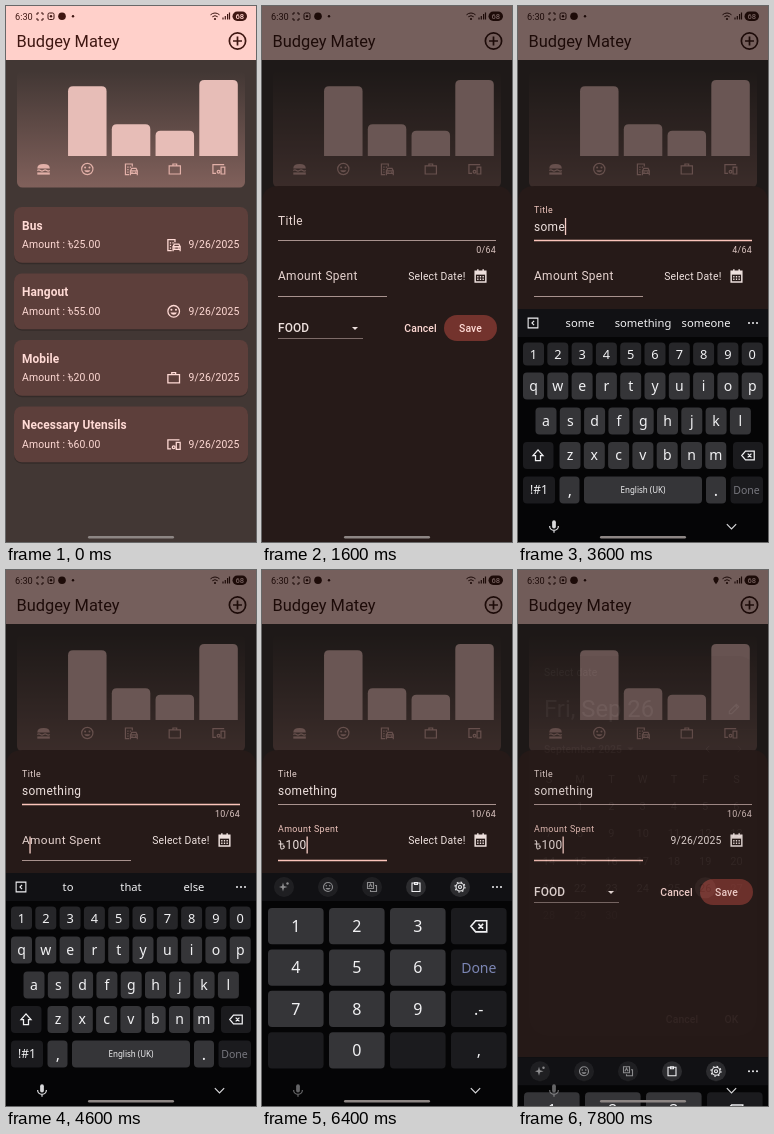
Write an HTML page that moves like this. It is 250 px wide and 536 px high and loops after 8000 ms.

```html
<!DOCTYPE html>
<html lang="en">
<head>
<meta charset="utf-8">
<title>Expense tracker</title>
<style>
html, body { margin: 0; width: 100%; height: 100%; overflow: hidden; background: #423734; }
svg { display: block; width: 100%; height: 100%; }
text { font-family: Roboto, sans-serif; white-space: pre; }
#board text { font-family: "Noto Sans", sans-serif; }
</style>
</head>
<body>
<svg id="stage" viewBox="0 0 250 536"></svg>
<script>
const LOOP = 8000;
const INK = '#3f1712', ROSE = '#e7bdb7', PALE = '#ffdad5', PRIMARY = '#ffb4aa', SOFT = '#ede0dd';
const S = { sm: 8.9, md: 10.4, lg: 11.9 };

// ---------- markup helpers ----------
const text = (x, cy, str, size, o = {}) =>
  `<text x="${x}" y="${cy + size * 0.355}" font-size="${size}" fill="${o.fill || SOFT}"` +
  ` font-weight="${o.w || 400}" text-anchor="${o.a || 'start'}" letter-spacing="${o.ls ?? 0.18}"` +
  `${o.id ? ` id="${o.id}"` : ''}>${str}</text>`;
const box = (x, y, w, h, r, fill, extra = '') =>
  `<rect x="${x}" y="${y}" width="${w}" height="${h}" rx="${r}" fill="${fill}" ${extra}/>`;
const line = (x1, x2, y, col, w = 1, extra = '') =>
  `<path d="M${x1} ${y}H${x2}" stroke="${col}" stroke-width="${w}" ${extra}/>`;
const group = (id, body) => `<g id="${id}">${body}</g>`;
const range = n => [...Array(n).keys()];
const p = (d, extra = '') => `<path d="${d}" ${extra}/>`;
const solid = 'fill="currentColor" stroke="none"';
const dot = (x, y, r) => `<circle cx="${x}" cy="${y}" r="${r}" ${solid}/>`;
const ring = (x, y, r, extra = '') => `<circle cx="${x}" cy="${y}" r="${r}" ${extra}/>`;

// Icons live on a 24 unit grid
const ICONS = {
  food: p('M2 11q0-7 10-7t10 7z', solid) + p('M2 14.5q2.500-2 5 0t5 0 5 0 5 0') + p('M2 17.500h20v3.500H2z', solid),
  fun: ring(12, 12, 9) + dot(8.5, 9.5, 1.6) + dot(15.5, 9.5, 1.6) + p('M7 14h10a5.4 5.4 0 0 1-10 0z', solid),
  travel: p('M9 21H3V4h11v4M6 9h2M10 9h2M6 13h2M6 17h2') +
    p('M11 22v-7l2-4h7l2 4v7M11 15h11v4H11z') + dot(13.5, 17, 1.2) + dot(19.5, 17, 1.2),
  work: p('M3 7h18v13H3zM9 7V4h6v3'),
  tech: p('M8 19H3V5h18M16 9h6v11h-6z') + ring(12, 16.5, 2.2),
  add: ring(12, 12, 10) + p('M12 6.5v11M6.5 12h11'),
  calendar: p('M4 5h16v16H4zM8 2v4M16 2v4') + p('M4 5h16v5H4z', solid) + p('M7 13h2M11 13h2M15 13h2M7 17h2M11 17h2M15 17h2'),
  pencil: p('M4 20v-4L16 4l4 4L8 20zM14 6l4 4'),
  left: p('M15 5l-7 7 7 7'),
  right: p('M9 5l7 7-7 7'),
  down: p('M4 8l8 8 8-8'),
  erase: p('M8 5h14v14H8l-6-7zM11.5 9l6 6M17.5 9l-6 6'),
  shift: p('M12 3l8 9h-4v8H8v-8H4z'),
  mic: p('M9 5a3 3 0 0 1 6 0v7a3 3 0 0 1-6 0z', solid) + p('M5 11a7 7 0 0 0 14 0M12 18v4'),
  spark: p('M10 3l2 7 7 2-7 2-2 7-2-7-6-2 6-2z', solid) + dot(19, 5, 2.4),
  swap: p('M3 3h12v12H3zM9 18v3h12V9h-3M6 12l3-6 3 6'),
  clip: p('M4 4h16v17H4zM9 3h6v4H9z'),
  gear: ring(12, 12, 3) + ring(12, 12, 8) + ring(12, 12, 10, 'stroke-dasharray="3.2 4.65"'),
  panel: p('M3 3h18v18H3zM14 8l-4 4 4 4'),
  pin: p('M12 22Q5 13 5 9a7 7 0 0 1 14 0q0 4-7 13z', solid)
};
const icon = (name, x, y, size, col, w = 2) =>
  `<g transform="translate(${x - size / 2} ${y - size / 2}) scale(${size / 24})" fill="none"` +
  ` stroke="currentColor" stroke-width="${w}" color="${col}">${ICONS[name]}</g>`;
const taka = (x, cy, size, col) =>
  `<g transform="translate(${x} ${cy + size * 0.355}) scale(${size / 10})" fill="none" stroke="${col}"` +
  ` stroke-width=".85"><path d="M.3-7q1.7-.6 1.7 1.2v4q0 1.7 1.5 1.5 2-.4 1.3-2.5M.2-4.3h4.2"/>` +
  `<circle cx="4.4" cy="-2.7" r=".3"/></g>`;
const caret = (x, y, col) => `<path d="M${x - 3} ${y - 1.6}h6l-3 3.2z" fill="${col}"/>`;

// ---------- home screen ----------
const KINDS = ['food', 'fun', 'travel', 'work', 'tech'];
const SPENT = [0, 55, 25, 20, 60];
const ITEMS = [['Bus', 2], ['Hangout', 1], ['Mobile', 3], ['Necessary Utensils', 4]];

function statusBar() {
  return text(9, 10.5, '6:30', 9.2, { fill: INK, ls: 0 }) +
    p('M31 9V7h2M35 7h2v2M37 12v2h-2M33 14h-2v-2', `fill="none" stroke="${INK}"`) +
    box(42, 7, 6, 6.5, 1.5, 'none', `stroke="${INK}"`) + `<circle cx="45" cy="10.2" r="1.2" fill="${INK}"/>` +
    `<circle cx="56" cy="10.3" r="3.8" fill="${INK}"/><circle cx="67" cy="10.3" r="1.2" fill="${INK}"/>` +
    group('place', icon('pin', 198, 10.5, 9, INK)) +
    p('M204.5 8.8q4.5-3.6 9 0M206.3 10.8q2.7-2.2 5.4 0', `fill="none" stroke="${INK}"`) +
    `<circle cx="209" cy="13" r="1.1" fill="${INK}"/>` +
    p('M217 13.5v-2M219.3 13.5V10M221.6 13.5V8M223.5 13.5v-7', `stroke="${INK}" stroke-width="1.2"`) +
    box(226.5, 5.5, 14.5, 9.5, 4.7, INK) + text(233.7, 10.3, '68', 7.6, { fill: '#ffd0ca', a: 'middle', ls: 0, w: 500 });
}

function home() {
  const bars = SPENT.map((v, i) => {
    const x = 18.3 + 43.75 * i, h = v / 60 * 76;
    return (v ? `<path d="M${x} 150v${5 - h}q0-5 5-5h28.5q5 0 5 5v${h - 5}z" fill="${ROSE}"/>` : '') +
      icon(KINDS[i], x + 19.25, 163, 15, '#e2b0a8', 1.9);
  }).join('');
  const cards = ITEMS.map(([name, k], i) => {
    const y = 201 + 66.5 * i;
    return box(8, y + 1.2, 234, 56, 8, '#000', 'opacity=".22"') + box(8, y, 234, 55.8, 8, '#5d3f3b') +
      text(16, y + 18.7, name, S.lg, { w: 700, fill: PALE, ls: 0.1 }) +
      text(16, y + 37.6, 'Amount :', S.md, { fill: PALE }) + taka(61.6, y + 37.6, S.md, PALE) +
      text(67.5, y + 37.6, SPENT[k] + '.00', S.md, { fill: PALE }) +
      icon(KINDS[k], 167.7, y + 37.8, 15.5, PALE) +
      text(182.5, y + 37.6, '9/26/2025', S.md, { fill: PALE });
  }).join('');
  return box(0, 0, 250, 536, 0, '#423734') + box(0, 0, 250, 54, 0, '#ffd0ca') + statusBar() +
    text(10.5, 35.3, 'Budgey Matey', 16.4, { fill: INK, ls: 0 }) + icon('add', 231.5, 35, 19.5, INK, 2.1) +
    box(11, 65, 228, 116.5, 5.5, 'url(#fade)') + bars + cards;
}

// ---------- entry sheet ----------
function sheet() {
  return p('M0 536V197q0-17 17-17h216q17 0 17 17v339z', 'fill="#261a18"') +
    text(16, 0, 'Title', S.lg, { id: 'titleLabel', ls: 0.35 }) +
    text(16, 220.5, '', S.lg, { id: 'titleText', ls: 0.35 }) + line(16, 234, 234.5, '#a8928e', 1, 'id="titleLine"') +
    text(234, 244, '', S.sm, { id: 'count', a: 'end', ls: 0.28, fill: '#dcc6c2' }) +
    text(16, 0, 'Amount Spent', S.lg, { id: 'sumLabel', ls: 0.35 }) +
    group('prefix', taka(16.3, 275, S.lg, SOFT)) +
    text(23.5, 275, '', S.lg, { id: 'sumText', ls: 0.35 }) + line(16, 125, 290.5, '#a8928e', 1, 'id="sumLine"') +
    box(0, 0, 1.3, 17, 0, '#f6cdc5', 'id="cursor"') +
    text(203.5, 270, '', S.md, { id: 'date', a: 'end' }) + icon('calendar', 218.5, 270, 16, SOFT, 2.2) +
    text(16, 322, 'FOOD', S.lg, { w: 500, ls: 0.1 }) + caret(93, 322.5, SOFT) + line(16, 101, 332.5, '#7d6b68') +
    text(158.5, 322, 'Cancel', S.md, { w: 500, a: 'middle', ls: 0.07, fill: PALE }) +
    box(182, 309, 53, 26, 13, '#73332d') +
    text(208.5, 322, 'Save', S.md, { w: 500, a: 'middle', ls: 0.07, fill: PALE });
}

// ---------- date picker ----------
const colX = c => 31 + 31.25 * c;
function picker() {
  const cell = (c, s, fill = SOFT) => text(colX(c), 0, s, 11, { a: 'middle', fill });
  const weeks = range(6).map(r => {
    const body = r ? range(7).map(c => {
      const d = 7 * r - 7 + c;
      if (d < 1 || d > 30) return '';
      return (d === 26 ? `<circle id="chosen" cx="${colX(c)}" cy="0" fill="${ROSE}"/>` : '') +
        cell(c, d, d === 26 ? '#3a1a16' : d > 26 ? '#857572' : SOFT);
    }).join('') : [...'SMTWTFS'].map((s, c) => cell(c, s)).join('');
    return group('week' + r, body);
  }).join('');
  return box(11, 35, 228, 258, 19, '#372a29', 'id="panel"') +
    group('head', text(26, 16, 'Select date', S.md, { fill: '#dcc6c2' }) +
      text(26, 53, 'Fri, Sep 26', 23.8, { ls: 0, fill: '#dccfcc' }) + icon('pencil', 216, 53, 14, SOFT) +
      line(11, 239, 73.5, '#554340') +
      text(26, 93, 'September 2025', S.md, { w: 500, ls: 0.07, fill: '#bfaeaa' }) + caret(112.5, 93, '#bfaeaa') +
      icon('left', 190, 93, 11, SOFT) + icon('right', 221, 93, 11, '#a08d89')) + weeks +
    group('actions', text(164, 0, 'Cancel', S.md, { w: 500, a: 'middle', ls: 0.07, fill: PALE }) +
      text(213.5, 0, 'OK', S.md, { w: 500, a: 'middle', ls: 0.07, fill: PALE }));
}

// ---------- keyboard ----------
const KEY = '#353538', DARK = '#1b1b1e', WHITE = '#f1f1f3';
const keyPos = {};
const label = (x, y, s, size, fill = WHITE, id) => text(x, y, s, size, { a: 'middle', ls: 0, fill, id });

function letters() {
  const rows = [['1234567890', 15.5, 348, 23], ['qwertyuiop', 15.5, 380, 27], ['asdfghjkl', 28, 415, 27], ['zxcvbnm', 52, 449.5, 27]];
  const keys = rows.map(([chars, x0, y, h], r) => [...chars].map((ch, i) => {
    const x = x0 + 24.3 * i;
    keyPos[ch] = [x, y];
    return box(x - 10.5, y - h / 2, 21, h, 4, r ? KEY : '#262629') + label(x, y, ch, r ? 14 : 12.8);
  }).join('')).join('');
  return keys + box(5, 436, 30.5, 27, 4, DARK) + icon('shift', 20, 449.5, 15, WHITE) +
    box(215, 436, 30, 27, 4, DARK) + icon('erase', 230, 449.5, 15, WHITE) +
    box(5, 470.5, 32, 27, 4, DARK) + label(21, 484, '!#1', 12) +
    box(41.5, 470.5, 20, 27, 4, KEY) + label(52, 484, ',', 16) +
    box(66, 470.5, 118, 27, 4, KEY) + label(125, 484, 'English (UK)', 8) +
    box(188, 470.5, 20, 27, 4, KEY) + label(198, 484, '.', 16) +
    box(212.5, 470.5, 32.5, 27, 4, DARK) + label(228.5, 484, 'Done', 10.5, '#77777e');
}

function digits() {
  return ['1', '2', '3', '<', '4', '5', '6', 'Done', '7', '8', '9', '.-', '', '0', '', ','].map((s, i) => {
    const x = 6 + 61 * (i % 4), y = 338 + 41.4 * (i >> 2), cx = x + 27.8, cy = y + 18.3;
    const digit = /\d/.test(s), done = s === 'Done';
    return box(x, y, 55.6, 36.3, 4, digit ? KEY : DARK, digit ? `id="num${s}"` : '') +
      (s === '<' ? icon('erase', cx, cy, 19, WHITE)
        : label(cx, cy, s, done ? 14 : 16, WHITE, done ? 'done' : ''));
  }).join('');
}

function keyboard() {
  const tool = (n, i) => `<circle cx="${22 + 44 * i}" cy="317" r="10" fill="#2c2c2f"/>` + icon(n, 22 + 44 * i, 317, 12, WHITE, 2.2);
  return box(0, 303, 250, 233, 0, '#050506') + box(0, 303, 250, 28, 0, '#111114') +
    group('tools', group('extra', ['spark', 'fun', 'swap'].map(tool).join('')) + tool('clip', 3) + tool('gear', 4)) +
    group('hints', icon('panel', 15, 317, 13, WHITE) + range(3).map(i => label(62 + 63 * i, 317, '', 11.2, WHITE, 'hint' + i)).join('')) +
    range(3).map(i => `<circle cx="${231 + 4 * i}" cy="317" r="1" fill="${WHITE}"/>`).join('') +
    group('letters', letters()) + group('digits', digits()) +
    group('pop', box(-21, -68, 42, 51, 8, '#3b3b3e') + label(0, -39, '', 20, WHITE, 'popChar'));
}

const svg = document.getElementById('stage');
svg.innerHTML =
  `<defs><linearGradient id="fade" x1="0" y1="1" x2="0" y2="0"><stop stop-color="${PRIMARY}" stop-opacity=".33"/>` +
  `<stop offset="1" stop-color="${PRIMARY}" stop-opacity="0"/></linearGradient></defs>` +
  home() + box(0, 0, 250, 536, 0, '#000', 'id="scrim"') + group('sheet', sheet()) +
  box(0, 0, 250, 536, 0, '#000', 'id="scrim2"') + group('picker', picker()) +
  group('board', keyboard()) +
  group('nav', group('mic', icon('mic', 36, 520.5, 15, '#d8d8da')) + icon('down', 213.5, 520.5, 14, '#d8d8da')) +
  box(82, 530, 86, 2.5, 1.2, '#8d8684');

// ---------- timeline ----------
const el = {};
svg.querySelectorAll('[id]').forEach(n => el[n.id] = n);
const set = (id, a) => { for (const k in a) el[id].setAttribute(k, a[k]); };
const show = (id, on) => set(id, { opacity: on ? 1 : 0 });
const move = (id, x, y) => set(id, { transform: `translate(${x} ${y})` });
const put = (id, s) => { if (el[id].textContent !== s) el[id].textContent = s; };
const ramp = (t, a, d) => Math.min(1, Math.max(0, (t - a) / d));
const out = u => 1 - (1 - u) ** 3;
const mix = (a, b, u) => a + (b - a) * u;
const last = (list, t) => list.filter(e => t >= e[0]).pop();

const TITLE_FOCUS = 2000, SUM_FOCUS = 4580, DIGITS_AT = 4900, OPEN = 6780, CLOSE = 7600;
const TITLE = [[0, ''], [2760, 's'], [3000, 'so'], [3200, 'som'], [3400, 'some'], [3640, 'somet'], [4050, 'something ']];
const SUM = [[0, ''], [5480, '1'], [5880, '10'], [6080, '100']];
const HINTS = [[0, ['', '', '']], [3000, ['so', 'some', 'something']], [3400, ['some', 'something', 'someone']],
  [3640, ['somet', 'something', 'sometimes']], [4050, ['to', 'that', 'else']]];

function floatLabel(id, t, start, rest, top, focused) {
  const u = out(ramp(t, start, 170)), size = mix(S.lg, S.sm, u);
  set(id, { 'font-size': size, y: mix(rest, top, u) + size * 0.355, fill: focused && u > 0.5 ? '#efc6be' : '#e6d3cf' });
}

function underline(id, lit) {
  set(id, { stroke: lit ? '#fcc5bb' : '#a8928e', 'stroke-width': lit ? 1.5 : 1 });
}

function render(t) {
  const up = out(ramp(t, 780, 270));
  set('scrim', { opacity: 0.54 * ramp(t, 780, 250) });
  move('sheet', 0, 356 * (1 - up));
  show('place', t >= OPEN);

  // Fields
  const inTitle = t >= TITLE_FOCUS && t < SUM_FOCUS, inSum = t >= SUM_FOCUS;
  const [titleAt, title] = last(TITLE, t), [sumAt, sum] = last(SUM, t);
  floatLabel('titleLabel', t, TITLE_FOCUS, 214.5, 204, inTitle);
  floatLabel('sumLabel', t, SUM_FOCUS + 20, 270, 259, inSum);
  put('titleText', title);
  put('count', title.length + '/64');
  put('sumText', sum);
  set('prefix', { opacity: ramp(t, SUM_FOCUS + 60, 120) });
  underline('titleLine', t >= TITLE_FOCUS && t < SUM_FOCUS + 60);
  underline('sumLine', t >= SUM_FOCUS + 60);
  const field = inSum ? 'sumText' : 'titleText';
  const since = t - (t >= CLOSE ? CLOSE : inSum ? Math.max(SUM_FOCUS, sumAt) : Math.max(TITLE_FOCUS, titleAt));
  set('cursor', {
    x: (inSum ? 23.6 : 16) + (el[field].textContent ? el[field].getComputedTextLength() : 0) - 0.2,
    y: inSum ? 266.5 : 212
  });
  show('cursor', t >= TITLE_FOCUS && since % 1000 < 500);
  put('date', t >= CLOSE ? '9/26/2025' : 'Select Date!');

  // Date picker grows once the keyboard leaves
  const seen = ramp(t, OPEN, 150) * (1 - ramp(t, CLOSE, 214));
  const k = out(ramp(t, 7010, 170));
  const top = mix(35, 86, k), first = mix(154, 209, k), pitch = mix(16.4, 27.2, k);
  set('scrim2', { opacity: 0.54 * seen });
  set('picker', { opacity: seen });
  set('panel', { y: top, height: mix(258, 380, k) });
  set('chosen', { r: mix(8, 10.5, k) });
  move('head', 0, top);
  for (let r = 0; r < 6; r++) move('week' + r, 0, first + pitch * r);
  move('actions', 0, mix(277, 449, k));

  // Keyboard
  const hide = ramp(t, 6880, 300) ** 1.65, back = ramp(t, 7730, 270);
  const shown = t < 6880 ? out(ramp(t, 2080, 280)) : t < 7730 ? 1 - hide : 1 - (1 - back) ** 0.77;
  const numeric = t >= DIGITS_AT, hinting = t >= 3000 && !numeric;
  move('board', 0, 233 * (1 - shown));
  show('board', shown > 0);
  show('nav', (t >= 2080 && t < 6880) || t >= 7730);
  set('mic', { opacity: numeric ? 0.45 : 1 });
  show('hints', hinting);
  show('tools', !hinting);
  last(HINTS, t)[1].forEach((s, i) => put('hint' + i, s));
  set('extra', { opacity: numeric ? 0.55 : 1 });
  show('letters', !numeric);
  show('digits', numeric);
  set('done', { fill: t >= 5880 ? '#7c86b4' : '#74747e' });
  const key = keyPos[title.slice(-1)], pressed = key && t - titleAt < 170;
  show('pop', pressed);
  if (pressed) {
    move('pop', Math.max(24, Math.min(226, key[0])), key[1]);
    put('popChar', title.slice(-1));
  }
  for (const d of '10') set('num' + d, { fill: sum.endsWith(d) && t - sumAt < 110 ? '#55555a' : KEY });
}

const begin = performance.now();
function tick() {
  render((performance.now() - begin) % LOOP);
  requestAnimationFrame(tick);
}
tick();
</script>
</body>
</html>
```
